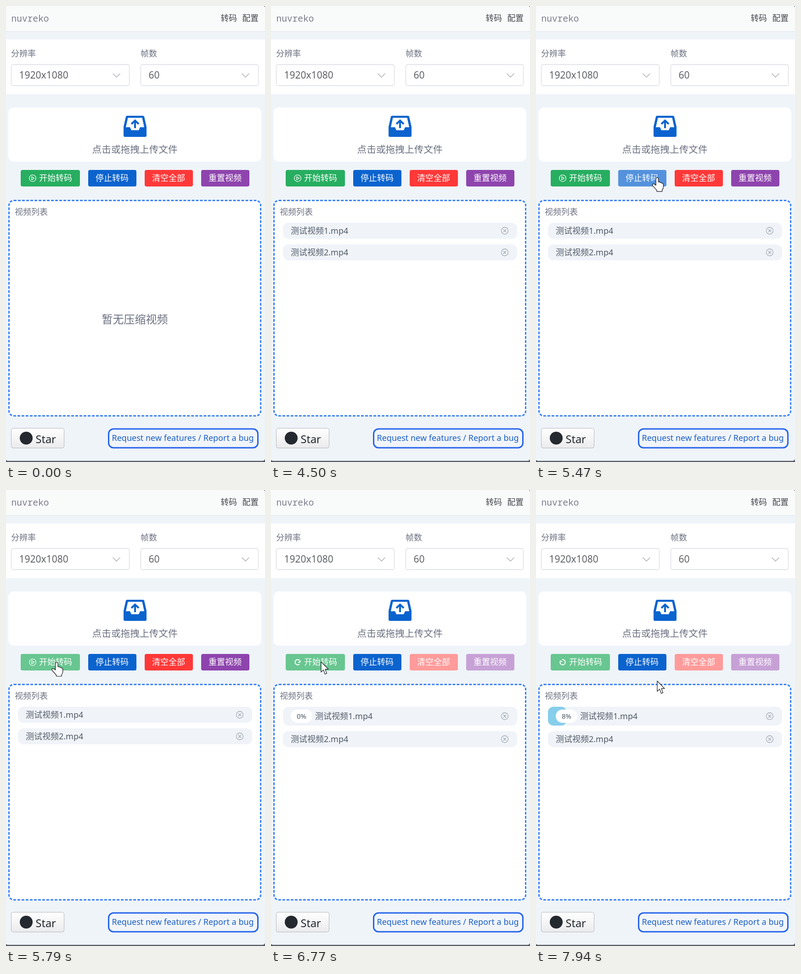
Recreate the animation shown at these times as an HTML page. Size 564 px wide and 993 px high, loop 8 s.

```html
<!DOCTYPE html>
<html lang="zh-CN">
<head>
<meta charset="utf-8">
<style>
html, body { margin: 0; width: 100%; height: 100%; overflow: hidden; background: #565b64; }
svg { display: block; }
text { font: 18px 'Noto Sans', 'Noto Sans CJK SC', 'Noto Sans CJK', sans-serif; }
.mono { font: 19.5px 'Noto Sans Mono', monospace; fill: #7d7b8c; }
.list { box-sizing: border-box; width: 551px; height: 472px; background: #fff; border: 3px dashed #3b82f6; border-radius: 12px; }
.line { fill: none; stroke-linecap: round; stroke-linejoin: round; }
.white { stroke: #fff; stroke-width: 1.3; }
.cursor { fill: #fff; stroke: #16161c; stroke-width: 1.2; stroke-linejoin: round; }
</style>
</head>
<body>
<svg id="stage" width="564" height="993" viewBox="0 0 564 993"></svg>
<script>
const LOOP = 8000, LISTED = 4500, ENTER = 5070, START = 6450;
const PROGRESS = [7300, 7900, 8];
const GREY = '#6b7080';

// time, x, y, easing of the leg that arrives here
const smooth = u => u * u * (3 - 2 * u);
const easeOut = u => 1 - (1 - u) ** 2;
const PATH = [
  [ENTER, 345, 582],
  [5330, 307, 372, easeOut],
  [5790, 109, 374, smooth],
  [7300, 109, 374, smooth],
  [7900, 264, 416, smooth],
];

// x, width, label, label x, normal, hover, disabled
const BUTTONS = [
  [32, 129, '开始转码', 72, '#27ae60', '#68c690', '#68c690'],
  [179, 105, '停止转码', 195, '#0b63ce', '#5492dd', '#0b63ce'],
  [302, 105, '清空全部', 318, '#ff3838', '#ff7474', '#ff9b9b'],
  [425, 105, '重置视频', 441, '#8e44ad', '#b07cc6', '#c7a1d6'],
];

const rect = (x, y, w, h, r, fill, more = '') =>
  `<rect x="${x}" y="${y}" width="${w}" height="${h}" rx="${r}" fill="${fill}" ${more}/>`;
const text = (x, y, s, size = 18, fill = GREY, more = '') =>
  `<text x="${x}" y="${y}" style="font-size:${size}px;fill:${fill}" ${more}>${s}</text>`;
const line = (d, color, width) =>
  `<path class="line" d="${d}" stroke="${color}" stroke-width="${width}"/>`;

const select = (x, w, label, value) =>
  text(x, 109.5, label) +
  rect(x + .5, 127.5, w, 46, 4, '#fff', 'stroke="#d9dce3" stroke-width="1.3"') +
  text(x + 17.5, 158, value, 21, '#606266') +
  line(`M${x + w - 35} 147.5l7.5 7.5 7.5-7.5`, '#a8abb2', 1.4);

const uploadIcon =
  '<path fill="#0b63ce" d="M264 239H298Q300.500 239 301 241L306 263V282Q306 285 303 285H259Q256 285 256 282V263L261 241Q261.500 239 264 239Z"/>' +
  '<path fill="#fff" d="M265.500 243.500H296.500L301 264H292L289 270.500H273L270 264H261Z"/>' +
  '<path fill="none" stroke="#0b63ce" stroke-width="4" d="M273 257L281 249.500L289 257M281 250V266"/>';

const button = ([x, w, label, tx, fill], i) =>
  rect(x, 357, w, 36, 4, fill, `id="button${i}"`) + text(tx, 381, label, 18, '#fff');

const row = (i, name) => `<g id="row${i}">` +
  rect(26, 0, 510, 35, 12, '#f0f4f9', `id="back${i}"`) +
  (i ? '' : '<g id="progress">' + rect(26, 0, 0, 41, 12, '#87ceeb', 'id="bar"') +
    rect(43, 6, 47, 29, 14.5, '#fff') +
    text(66.5, 25.7, '0%', 15, '#4b5563', 'id="percent" text-anchor="middle"') + '</g>') +
  text(43, 23.8, name, 18, '#525a67', `id="name${i}"`) +
  `<g id="close${i}">` +
  line('M501.5 0a7.5 7.5 0 1 1 15 0a7.5 7.5 0 1 1-15 0M506.3-2.7l5.4 5.4m0-5.4l-5.4 5.4', '#a3abb4', 1.3) +
  '</g></g>';

stage.innerHTML =
  '<defs><linearGradient id="shade" x2="0" y2="1"><stop stop-color="#fff"/><stop offset="1" stop-color="#ebebed"/></linearGradient></defs>' +
  rect(-1, 0, 565, 990.5, 5, '#eff4f9') +
  '<path fill="#f9fbfb" d="M0 0H560Q564 0 564 4V55H0Z"/>' +
  rect(0, 55, 564, 1, 0, '#dfe6ea') +
  '<text class="mono" x="11.5" y="34">nuvreko</text>' +
  text(467.5, 33, '转码', 17.8, '#45484d') + text(514.5, 33, '配置', 17.8, '#45484d') +
  rect(0, 73, 564, 119, 0, '#fff') +
  select(11, 257, '分辨率', '1920x1080') + select(293, 256, '帧数', '60') +
  rect(5, 221, 551, 118, 12, '#fff') + uploadIcon +
  text(187.5, 320, '点击或拖拽上传文件', 20.7) +
  BUTTONS.map(button).join('') +
  '<g id="play" class="line white"><circle cx="58" cy="375" r="7.2"/><path d="M56 371.5V378.5L61.5 375Z"/></g>' +
  '<path id="spinner" class="line" stroke="#fff" stroke-width="2" d="M3.4 4.6A5.7 5.7 0 1 1 5.7-.5L2 .3"/>' +
  '<foreignObject x="5" y="422" width="551" height="472"><div class="list"></div></foreignObject>' +
  text(19, 454.5, '视频列表') +
  text(208.5, 691, '暂无压缩视频', 24, GREY, 'id="empty"') +
  row(0, '测试视频1.mp4') + row(1, '测试视频2.mp4') +
  rect(11.5, 919.5, 115, 43, 4, 'url(#shade)', 'stroke="#b3b6ba"') +
  '<circle cx="44" cy="941" r="14" fill="#24292f"/>' +
  text(64.5, 952, 'Star', 23.5, '#24292f') +
  rect(223.5, 921, 325, 41, 10.5, '#f1f5fa', 'stroke="#2563eb" stroke-width="3"') +
  text(230.5, 947, 'Request new features / Report a bug', 18, '#1b5fc4') +
  '<path id="hand" class="cursor" d="M-3 17V3a2.8 2.8 0 0 1 5.6 0V10q3.6-1 4.4 1.4q3-.6 3.6 1.4q2.6-.2 2.6 3V20.5q0 4-2.6 6.5V30.5H-1V28L-9.5 18.5q-2.5-3 .5-4.5q2-.6 3.6 1Z"/>' +
  '<path id="arrow" class="cursor" d="M0 0V22.5L5.2 17.6L8.7 27L12.5 25.4L9 16.3H16Z"/>';

const el = id => document.getElementById(id);
const set = (id, key, value) => el(id).setAttribute(key, value);
const show = (id, on) => set(id, 'visibility', on ? 'visible' : 'hidden');
const move = (id, x, y, more = '') => set(id, 'transform', `translate(${x} ${y}) ${more}`);

function pointer(t) {
  const i = PATH.findIndex(p => p[0] > t);
  if (i < 1) return PATH.at(i).slice(1, 3);
  const [t0, x0, y0] = PATH[i - 1], [t1, x1, y1, ease] = PATH[i];
  const u = ease((t - t0) / (t1 - t0));
  return [x0 + (x1 - x0) * u, y0 + (y1 - y0) * u];
}

function draw(t) {
  const listed = t >= LISTED, inside = t >= ENTER, busy = t >= START;
  const [x, y] = pointer(t);
  const hover = inside && !busy && y >= 357 && y < 393
    ? BUTTONS.findIndex(([bx, w]) => x >= bx && x < bx + w) : -1;

  BUTTONS.forEach(([, , , , normal, light, disabled], i) =>
    set('button' + i, 'fill', busy ? disabled : i === hover ? light : normal));
  show('play', !busy);
  show('spinner', busy);
  move('spinner', 58, 375, `rotate(${(t - 6770) * .18})`);

  show('empty', !listed);
  const grow = busy ? 6 : 0;
  for (const i of [0, 1]) {
    const height = i ? 35 : 35 + grow;
    show('row' + i, listed);
    move('row' + i, 0, i ? 519 + grow : 472);
    set('back' + i, 'height', height);
    move('close' + i, 0, height / 2);
  }
  set('name0', 'x', busy ? 96 : 43);
  set('name0', 'y', 23.8 + grow / 2);

  const [from, to, goal] = PROGRESS;
  const percent = Math.round(goal * Math.min(1, Math.max(0, (t - from) / (to - from))));
  show('progress', busy);
  set('bar', 'width', percent * 5.1);
  el('percent').textContent = percent + '%';

  show('hand', hover >= 0);
  show('arrow', inside && hover < 0);
  move('hand', x + 1.5, y + 1);
  move('arrow', x, y);
}

function frame() {
  draw(performance.now() % LOOP);
  requestAnimationFrame(frame);
}
frame();
</script>
</body>
</html>
```
